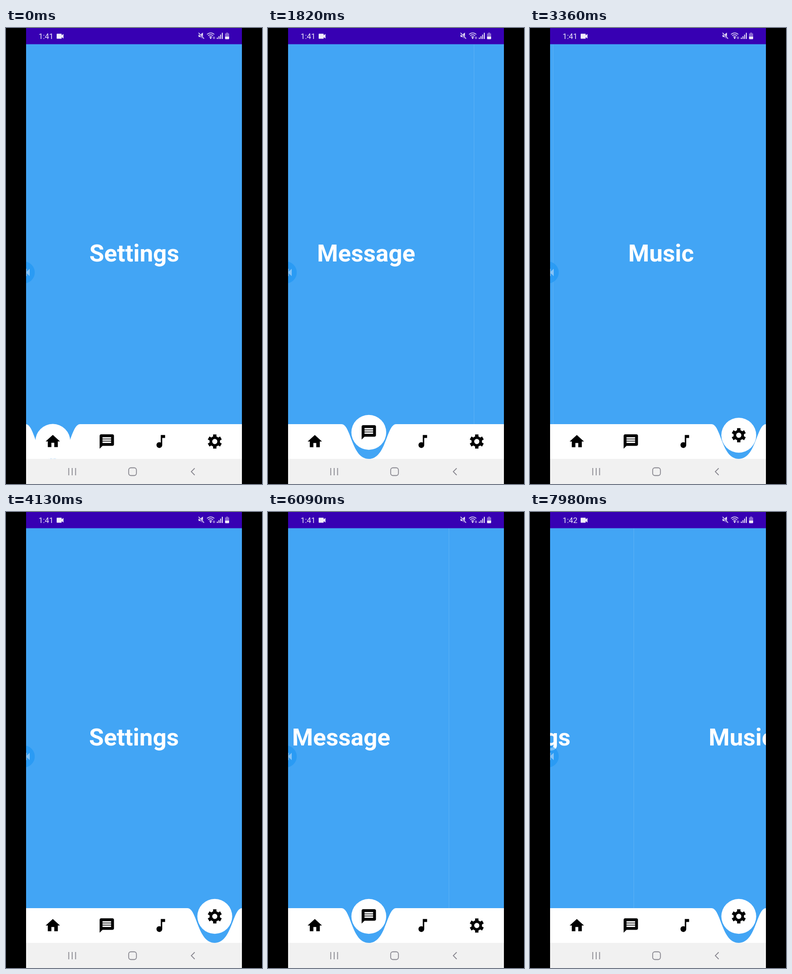
Write an HTML page that moves like this. It is 561 px wide and 998 px high and loops after 8.05 s.

```html
<!DOCTYPE html>
<html lang="en">
<head>
<meta charset="utf-8">
<title>Bottom navigation</title>
<style>
  html, body { margin: 0; width: 100%; height: 100%; overflow: hidden; background: #000; }
  svg { display: block; width: 100%; height: 100%; }
  text { font-family: Roboto, sans-serif; fill: #fff; }
  .title { font-size: 52.56px; font-weight: 700; text-anchor: middle; }
  .clock { font-size: 16.8px; fill: #f1ecfa; }
</style>
</head>
<body>
<svg viewBox="0 0 561 998">
  <defs>
    <clipPath id="screen"><rect x="44" width="473" height="998"/></clipPath>
  </defs>
  <rect width="561" height="998"/>
  <g clip-path="url(#screen)">
    <rect x="44" y="35" width="473" height="910" fill="#42a5f5"/>
    <text id="oldTitle" class="title" y="511"></text>
    <text id="newTitle" class="title" y="511"></text>
    <path id="seam" d="M0 36V867" stroke="#fff" stroke-opacity=".14"/>

    <!-- floating recorder button -->
    <circle cx="39" cy="535" r="24" fill="#1c94f3" fill-opacity=".6"/>
    <path d="M44 527h1.5v6L52 527v16l-6.500-6v6H44z" fill="#84c3f8"/>

    <!-- status bar -->
    <rect x="44" width="473" height="35.500" fill="#3700b3"/>
    <text id="clock" class="clock" x="71.500" y="23.700"></text>
    <g fill="#f1ecfa">
      <path d="M112 12.500h9q1 0 1 1v2.500l4-3v10l-4-3v2.500q0 1-1 1h-9q-1 0-1-1v-9q0-1 1-1z"/>
      <path d="M422 14.500h4l5.500-4.500v14l-5.500-4.500h-4z"/>
      <path d="M462 21h2v3h-2zM465.700 18h2v6h-2zM469.300 14.500h2v9.500h-2zM473 10.500h2V24h-2z"/>
      <path d="M480 18.500h9V23q0 1.500-1.500 1.500h-6q-1.500 0-1.500-1.500z"/>
      <circle cx="448.500" cy="22" r="1.800"/>
    </g>
    <path d="M480 18.500V13q0-1.200 1.200-1.200h1.300V10h4v1.800h1.300Q489 11.800 489 13v5.500z" fill="#8a68d2"/>
    <path d="M421 10l13 14" stroke="#3700b3" stroke-width="3.500"/>
    <path d="M422 10.500l12 13" stroke="#f1ecfa" stroke-width="1.600"/>
    <path d="M440.500 14q8-6.500 16 0M443 17q5.500-4.500 11 0M445.500 20q3-2.500 6 0" fill="none" stroke="#f1ecfa" stroke-width="1.600"/>
    <path d="M454.500 19v5M457 19v5" stroke="#d5c8ee" stroke-width="1.200"/>

    <!-- tab bar -->
    <path id="bar" fill="#fff"/>
    <circle id="disc" r="38.200" fill="#fff"/>
    <g id="icons">
      <path d="M10 20v-6h4v6h5v-8h3L12 3 2 12h3v8z"/>
      <path d="M20 2H4C2.900 2 2 2.900 2 4V22l4-4h14c1.100 0 2-.9 2-2V4c0-1.100-.9-2-2-2zm-2 12H6v-2h12v2zm0-3H6V9h12v2zm0-3H6V6h12v2z"/>
      <path d="M12 3v10.550c-.59-.34-1.270-.55-2-.55-2.210 0-4 1.790-4 4s1.790 4 4 4 4-1.790 4-4V7h4V3z"/>
      <g>
        <circle cx="12" cy="12" r="7.300"/>
        <path id="teeth" stroke="#000" stroke-width="4.700"/>
        <circle cx="12" cy="12" r="3.600" fill="#fff"/>
      </g>
    </g>

    <!-- system navigation -->
    <rect x="44" y="943" width="473" height="55" fill="#f1f1f1"/>
    <g fill="none" stroke="#88878f" stroke-width="1.800">
      <path d="M137.500 963v16M145 963v16M152.500 963v16M413.500 963.500L406 971l7.500 7.500"/>
      <rect x="268.800" y="962.500" width="17" height="17" rx="5"/>
    </g>
  </g>
</svg>
<script>
const LOOP = 8050, STEP = 70, CLOCK_TICK = 7000;
const SLIDE = 800, RISE = 250;
const LEFT = 44, WIDTH = 473, CENTER = 280.4;
const BAR_TOP = 867, BAR_BOTTOM = 943, REST_Y = 905, LIFT = 20;
const ICON_SCALE = 1.57;
const TITLES = ['Home', 'Message', 'Music', 'Settings'];

// Start of each tab switch: [icon rise, page slide]; tabs are visited in turn.
const SWITCHES = [
  [-20, -20], [1170, 1214], [2210, 2255], [3250, 3299],
  [4540, 4583], [5515, 5559], [6550, 6598], [7590, 7638]
];

const el = id => document.getElementById(id);
const icons = [...el('icons').children];
const clamp = v => Math.min(1, Math.max(0, v));
const tabX = i => 102.600 + 118.300 * i;

const easeInOut = t => (1 - Math.cos(Math.PI * t)) / 2;

// cubic-bezier(.4, 0, .2, 1)
function fastOutSlowIn(x) {
  let lo = 0, hi = 1;
  for (let i = 0; i < 24; i++) {
    const s = (lo + hi) / 2, r = 1 - s;
    if (1.2 * r * r * s + 0.6 * r * s * s + s ** 3 < x) lo = s; else hi = s;
  }
  return 3 * (1 - lo) * lo * lo + lo ** 3;
}

function barPath(x) {
  const half = 60, pull = 38.500;
  return `M-100 ${BAR_TOP}H${x - half}` +
    `C${x - pull} ${BAR_TOP} ${x - pull} ${BAR_BOTTOM} ${x} ${BAR_BOTTOM}` +
    `C${x + pull} ${BAR_BOTTOM} ${x + pull} ${BAR_TOP} ${x + half} ${BAR_TOP}` +
    `H700V${BAR_BOTTOM}H-100Z`;
}

function lastStarted(t, column) {
  let index = 0;
  SWITCHES.forEach((s, i) => { if (s[column] <= t) index = i; });
  return index;
}

function setTitle(id, tab, offset) {
  el(id).textContent = TITLES[tab];
  el(id).setAttribute('x', CENTER + offset);
}

function render(t) {
  const tabSwitch = lastStarted(t, 0), tab = tabSwitch % 4;
  const rise = fastOutSlowIn(clamp((t - SWITCHES[tabSwitch][0]) / RISE));
  const activeY = REST_Y - LIFT * rise;
  el('bar').setAttribute('d', barPath(tabX(tab)));
  el('disc').setAttribute('cx', tabX(tab));
  el('disc').setAttribute('cy', activeY);
  icons.forEach((icon, i) => {
    const y = i === tab ? activeY : REST_Y;
    icon.setAttribute('transform',
      `translate(${tabX(i)} ${y}) scale(${ICON_SCALE}) translate(-12 -12)`);
  });

  const pageSwitch = lastStarted(t, 1), page = pageSwitch % 4;
  const shift = WIDTH * easeInOut(clamp((t - SWITCHES[pageSwitch][1]) / SLIDE));
  setTitle('newTitle', page, shift - WIDTH);
  setTitle('oldTitle', (page + 3) % 4, shift);
  const sliding = shift > 2 && shift < WIDTH - 1;
  el('seam').setAttribute('visibility', sliding ? 'visible' : 'hidden');
  el('seam').setAttribute('transform', `translate(${Math.floor(LEFT + shift) + 0.5} 0)`);

  el('clock').textContent = t < CLOCK_TICK ? '1:41' : '1:42';
}

el('teeth').setAttribute('d', [30, 90, 150].map(deg => {
  const a = deg * Math.PI / 180, dx = 9.900 * Math.cos(a), dy = 9.900 * Math.sin(a);
  return `M${12 - dx} ${12 - dy}L${12 + dx} ${12 + dy}`;
}).join(''));

const start = performance.now();
function frame() {
  const t = (performance.now() - start) % LOOP;
  render(Math.floor(t / STEP) * STEP);
  requestAnimationFrame(frame);
}
frame();
</script>
</body>
</html>
```
